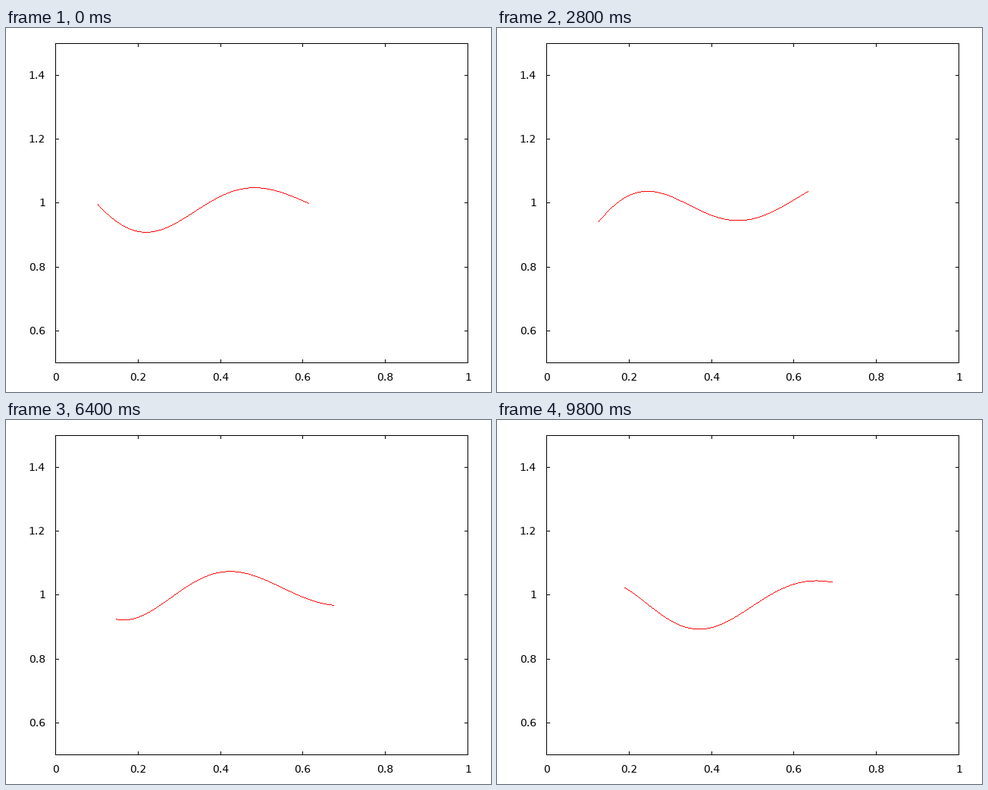
A matplotlib script for the animation above (9900 ms loop, 640 by 480 pixels).

```python
import numpy as np
import matplotlib.pyplot as plt
from matplotlib.animation import FuncAnimation
from matplotlib.collections import LineCollection

W, H, DPI = 640, 480, 100
FRAMES, INTERVAL = 99, 100
PERIOD = 53              # frames per undulation
PX = 72 / DPI            # one pixel in points
LEFT, RIGHT, TOP, BOTTOM = 65, 609, 20, 441
TICK = 5

plt.rcParams["font.family"] = "DejaVu Sans"
plt.rcParams["text.hinting"] = "default"

fig = plt.figure(figsize=(W / DPI, H / DPI), dpi=DPI, facecolor="white")
ax = fig.add_axes([0, 0, 1, 1])
ax.set_xlim(0, W)
ax.set_ylim(H, 0)
ax.axis("off")


def stroke(xs, ys):
    """Black line, one pixel wide, through pixel centres."""
    ax.plot(np.add(xs, 0.5), np.add(ys, 0.5), color="black", lw=PX,
            solid_capstyle="projecting", solid_joinstyle="miter", snap=False)


def label(x, y, value, align):
    ax.text(x, y, f"{value:g}", ha=align, va="baseline",
            fontsize=14 * PX, color="black")


def draw_axes():
    stroke([LEFT, RIGHT, RIGHT, LEFT, LEFT], [TOP, TOP, BOTTOM, BOTTOM, TOP])
    for value in (0, 0.2, 0.4, 0.6, 0.8, 1):
        x = round(LEFT + value * (RIGHT - LEFT))
        stroke([x, x], [BOTTOM, BOTTOM - TICK + 1])
        stroke([x, x], [TOP, TOP + TICK - 1])
        label(x + 0.5, 465, value, "center")
    for value in (0.6, 0.8, 1, 1.2, 1.4):
        y = round(BOTTOM - (value - 0.5) * (BOTTOM - TOP))
        stroke([LEFT, LEFT + TICK - 1], [y, y])
        stroke([RIGHT, RIGHT - TICK + 1], [y, y])
        label(52, y + 5, value, "right")


def swimmer(t):
    """Pixel path of the body: a damped travelling wave that drifts right."""
    w = 2 * np.pi * t / PERIOD

    def swing(lag, harmonic=1):
        return np.cos(harmonic * w - np.radians(lag))

    tail = 120.3 + 0.45 * t + 8.3 * swing(285, 2) + 3 * swing(130)
    head = 399.5 + 0.46 * t + 3.2 * swing(75)

    u = np.linspace(0, 1, 201)
    size = 49.5 * np.exp(-1.05 * u)
    in_phase = size * np.sin(6.03 * u) - 13.5 + 12 * u + 12.5 * u**2
    quadrature = size * np.cos(6.03 * u) - 28.5 + 54 * u - 24 * u**2
    y = 245.5 - 21 * u + in_phase * np.cos(w) + quadrature * np.sin(w)
    return tail + u * (head - tail), y


def rasterise(x, y):
    """One-pixel dashes along the path, one per row or column crossed."""
    step = np.maximum(np.abs(np.diff(x)), np.abs(np.diff(y)))
    travelled = np.concatenate([[0], np.cumsum(step)])
    at = np.arange(travelled[-1])
    px = np.round(np.interp(at, travelled, x))
    py = np.round(np.interp(at, travelled, y)) + 0.5
    return np.stack([np.column_stack([px, py]),
                     np.column_stack([px + 1, py])], axis=1)


draw_axes()
body = LineCollection([], colors="#ff0000", linewidths=PX, capstyle="butt",
                      snap=False, zorder=3)
ax.add_collection(body, autolim=False)


def update(i):
    body.set_segments(rasterise(*swimmer(i)))
    return (body,)


anim = FuncAnimation(fig, update, frames=FRAMES, interval=INTERVAL,
                     repeat=True, repeat_delay=0, blit=False)
plt.show()
```
